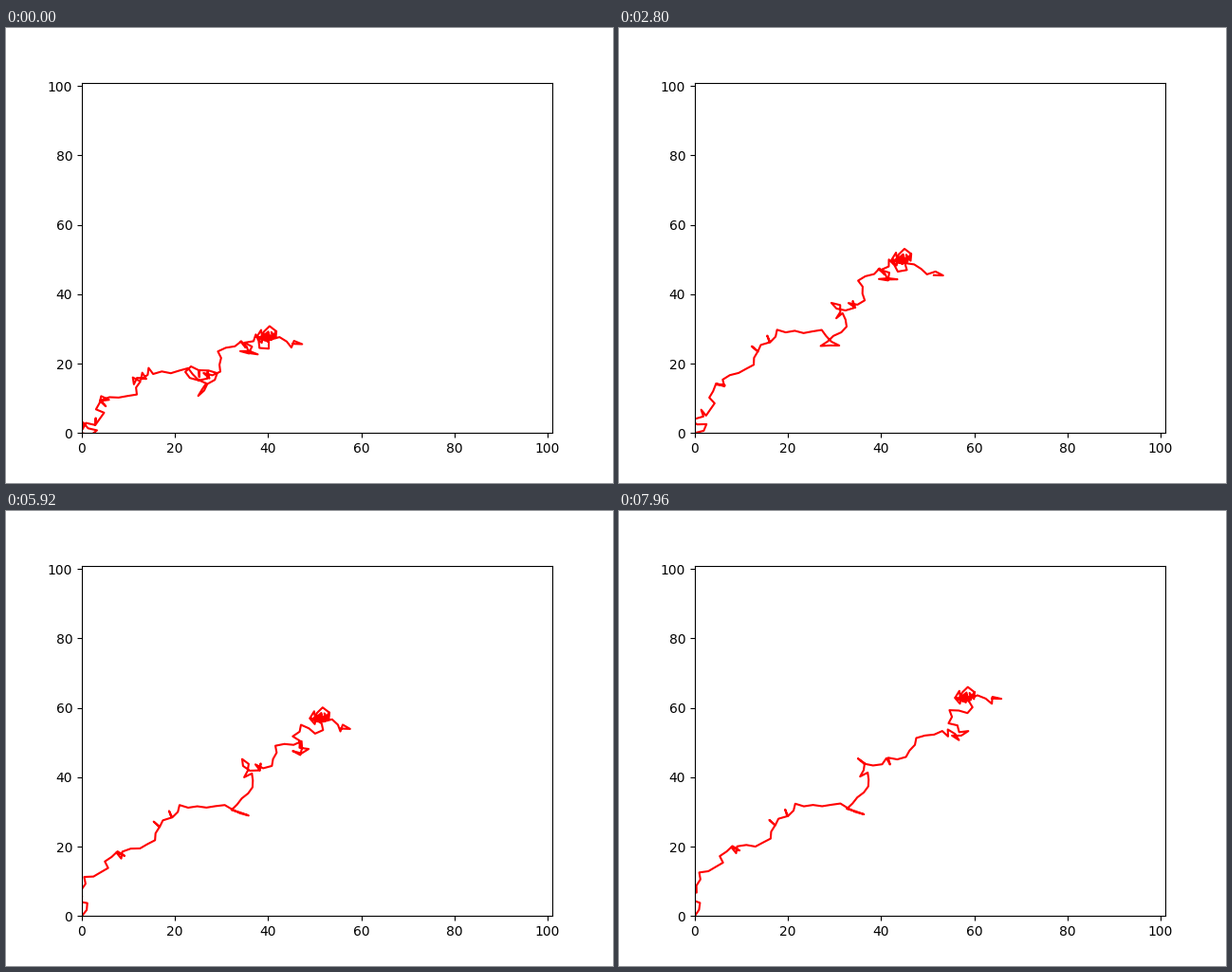
A matplotlib script for the animation above (8 s loop, 640 px wide and 480 px high).

```python
import numpy as np
import matplotlib.pyplot as plt
from matplotlib.animation import FuncAnimation

FRAMES, INTERVAL = 200, 40
BOND = 2.0
CHUNK = 3  # neighbouring bonds that flip together
HOOK = (-2.0, 0.1)  # last bond, folded back

# Bonds per section; the tangle starts and ends at the same landmark.
SECTIONS = dict(start=9, ledge=11, rise=13, shelf=7, riser=12,
                walk=20, knot=11, tangle=28, end=6)

# Key frame -> landmarks (data units) where the sections meet.
POSES = {
    0: [(2.9, 2.3), (7.9, 10.2), (15.3, 17), (26.7, 14.3),
        (22.2, 17.6), (36, 23.6), (38.7, 27.7), (47.3, 25.6)],
    30: [(2.9, 2.3), (6.7, 9.9), (15.9, 20), (27.9, 18.9),
         (23.6, 24.1), (37.9, 30.4), (40.7, 33.7), (47.2, 34)],
    70: [(2.4, 5), (9.4, 17.3), (19.5, 29), (31, 25.2),
         (29.3, 37.5), (41.5, 44.6), (43.4, 50), (53.3, 45.4)],
    95: [(2.4, 4.8), (10.8, 14.3), (20.8, 26.3), (33.8, 23.9),
         (32.4, 40.2), (44, 42.4), (45.8, 52.3), (53.4, 49)],
    125: [(2.4, 11), (10.8, 20.6), (20.8, 32.6), (33.8, 30.2),
          (32.4, 46.4), (45.8, 49), (49.9, 58.5), (57.4, 55.4)],
    165: [(2.9, 12.1), (13, 19.2), (23.4, 30.8), (36.3, 28.5),
          (35, 44.9), (47.6, 46), (50, 59.1), (59.9, 57.2)],
    199: [(2.9, 12.9), (13, 20), (23.4, 31.6), (36.3, 29.3),
          (35, 45.4), (57.2, 52), (57, 62.9), (65.8, 62.6)],
}

rng = np.random.default_rng(4)
WIGGLE = {name: rng.normal(0, 0.9, n) for name, n in SECTIONS.items()}
WIGGLE["tangle"] = rng.normal(2.4, 0.8, SECTIONS["tangle"]).cumsum()


def bridge(span, wiggle):
    """Freely jointed bonds of equal length that together cover the span."""
    angles = np.arctan2(span[1], span[0]) + wiggle
    bonds = BOND * np.column_stack([np.cos(angles), np.sin(angles)])
    for _ in range(60):
        bonds *= BOND / np.maximum(np.hypot(*bonds.T), 1e-6)[:, None]
        bonds += (span - bonds.sum(axis=0)) / len(bonds)
    return bonds


def bonds_of(landmarks):
    marks = np.array([(0, 0), *landmarks[:-1], *landmarks[-2:]])
    spans = np.diff(marks, axis=0)
    parts = [bridge(span, WIGGLE[name]) for name, span in zip(SECTIONS, spans)]
    return np.vstack([*parts, HOOK])


def flip_times(before, after, first, last):
    """Frame at which each bond takes its new direction."""
    chunk = np.arange(len(before)) // CHUNK
    moved = np.abs(before - after).max(axis=1) > 1e-3
    changed = np.unique(chunk[moved])
    rank = rng.permutation(len(changed)) + 1
    times = np.full(chunk[-1] + 1, last)
    times[changed] = first + np.ceil(rank / len(changed) * (last - first))
    return times[chunk]


KEYS = list(POSES)
BONDS = [bonds_of(landmarks) for landmarks in POSES.values()]
FLIPS = [flip_times(*pair, *span) for pair, span in
         zip(zip(BONDS, BONDS[1:]), zip(KEYS, KEYS[1:]))]


def chain(frame):
    k = min(np.searchsorted(KEYS, frame, side="right") - 1, len(FLIPS) - 1)
    bonds = np.where((FLIPS[k] <= frame)[:, None], BONDS[k + 1], BONDS[k])
    return np.vstack([(0, 0), bonds]).cumsum(axis=0).T


fig, ax = plt.subplots(figsize=(6.4, 4.8), dpi=100)
ax.set_xlim(0, 101)
ax.set_ylim(0, 101)
line, = ax.plot([], [], color="red", lw=1.5)


def update(frame):
    line.set_data(*chain(frame))
    return line,


anim = FuncAnimation(fig, update, frames=FRAMES, interval=INTERVAL,
                     repeat=True, repeat_delay=0)
plt.show()
```
